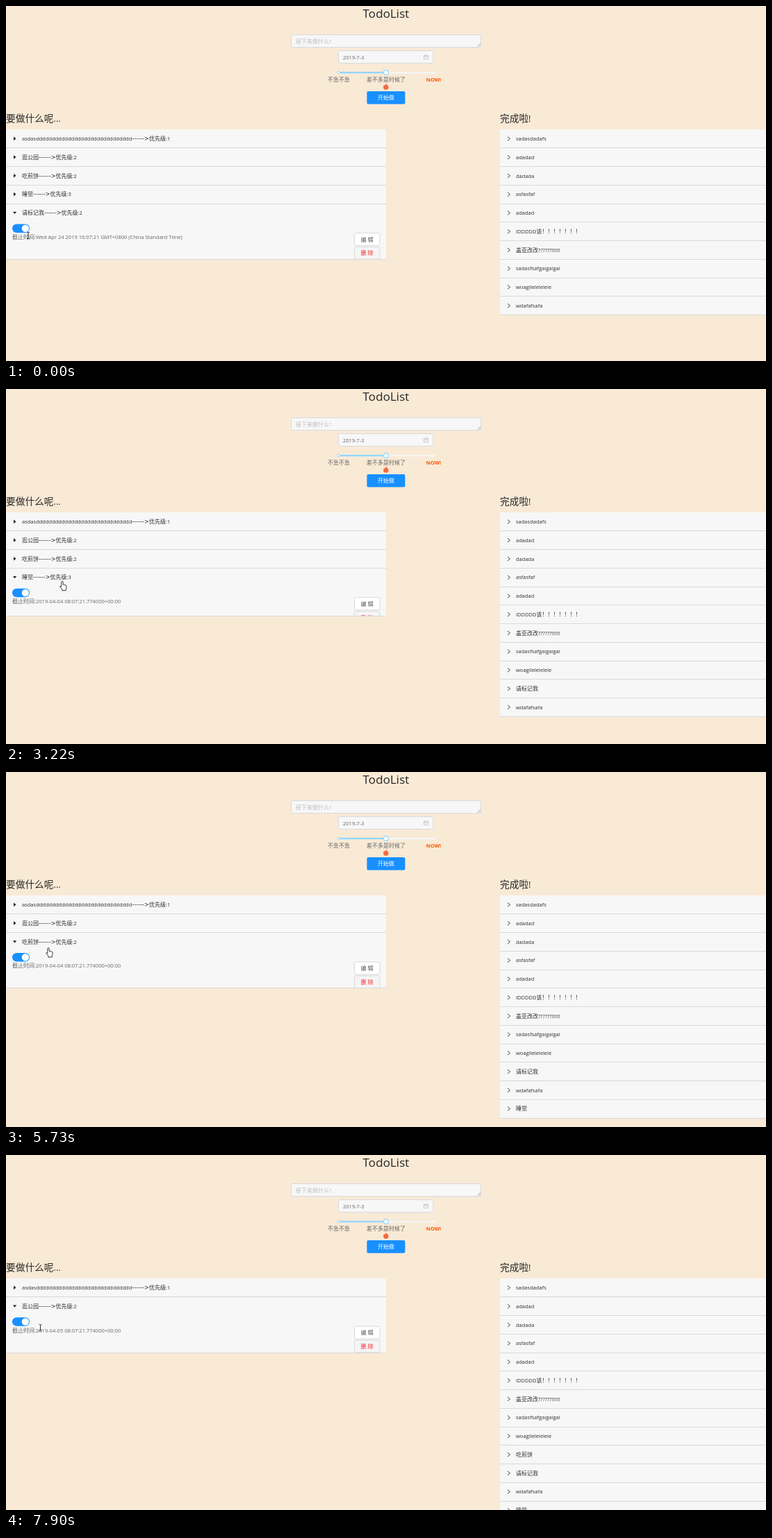
These frames come from a looping animation (1094x512 px, 8000 ms). An HTML page:

```html
<!DOCTYPE html>
<html lang="zh-CN">
<head>
<meta charset="utf-8">
<title>TodoList</title>
<style>
  html, body { margin: 0; width: 100%; height: 100%; overflow: hidden; background: #f9ead6; }
  svg { display: block; }
  text { font: 8px 'Open Sans', 'Noto Sans CJK SC', 'Noto Sans CJK JP', sans-serif; white-space: pre; }
  .latin { font-size: .94em; }
  .arrow { font: 8.2px 'DejaVu Sans', sans-serif; }
</style>
</head>
<body>
<svg id="stage" width="1094" height="512" viewBox="0 0 1094 512">
  <g id="form"></g>
  <g id="lists"></g>
</svg>
<script>
const LOOP = 8000, TOP = 178, ROW = 26.75, STEP = 134;
const INK = '#303030', SOFT = '#666', LINE = '#d9d9d9', PANEL = '#f7f7f7', BLUE = '#1890ff';

const todos = [
  { name: 'asdas' + 'd'.repeat(30), level: 1 },
  { name: '逛公园', level: 2, open: 7240, due: '2019-04-05 08:07:21.774000+00:00' },
  { name: '吃煎饼', level: 2, open: 5450, press: 6010, done: 6300, due: '2019-04-04 08:07:21.774000+00:00' },
  { name: '睡觉', level: 3, open: 2970, press: 4470, done: 4590, due: '2019-04-04 08:07:21.774000+00:00' },
  { name: '请标记我', level: 2, open: -1000, press: 1420, done: 1840,
    due: 'Wed Apr 24 2019 16:07:21 GMT+0800 (China Standard Time)' },
];
const finished = [
  ['sadasdadafs'], ['adadad'], ['dadada'], ['asfasfaf'], ['adadad'], ['IDDDDD该！！！！！！！'],
  ['盖亚改改??????!!!!!!'], ['sadasfsafgaigaigai'], ['woagilelelelele'],
  ['吃煎饼', 6300], ['请标记我', 1840], ['wdafafsafa'], ['睡觉', 4590],
];

// Pointer moves: start, end, number of visible steps, destination
const moves = [
  [150, 450, 3, 18.5, 323], [2120, 2700, 5, 81, 277.5], [3370, 3910, 5, 13.5, 296],
  [4870, 5300, 4, 76, 249.5], [5590, 5880, 3, 18.5, 266], [6440, 6970, 5, 62, 224],
  [7370, 7900, 5, 49.5, 249],
];
const pointers = {
  hand: 'M-1.2 6.5V1C-1.2-.6 1.1-.6 1.1 1V4.5L4.8 5.4Q6.4 5.9 6.1 8L5.2 11V13.2H-.2V11.6L-3.4 7.6Q-3.3 6-1.2 7.6Z',
  arrow: 'M0 0V9.6L2.2 7.6 3.9 11.3 5.5 10.6 3.9 7H6.8Z',
  beam: 'M-2-4.5H-.7L0-4 .7-4.5H2M0-4V4M-2 4.5H-.7L0 4 .7 4.5H2',
};

const clamp = v => Math.max(0, Math.min(1, v));
const smooth = v => v * v * (3 - 2 * v);
const mix = (a, b, f) => a + (b - a) * f;

const rect = (x, y, w, h, fill, attrs = '') =>
  `<rect x="${x}" y="${y}" width="${w}" height="${h}" fill="${fill}" ${attrs}/>`;
const box = (x, y, w, h, fill = PANEL) => rect(x, y, w, h, fill, `rx="2" stroke="${LINE}"`);
const path = (d, attrs) => `<path d="${d}" ${attrs}/>`;
const circle = (x, y, r, attrs) => `<circle cx="${x}" cy="${y}" r="${r}" ${attrs}/>`;
const text = (x, y, str, fill = INK, style = '') =>
  `<text x="${x}" y="${y}" fill="${fill}" style="${style}">` +
  str.replace(/[ -~]+/g, '<tspan class="latin">$&</tspan>')
     .replace('→', '<tspan class="arrow">------&gt;</tspan>') + '</text>';
const centered = (x, y, str, fill, style = '') => text(x, y, str, fill, 'text-anchor:middle;' + style);

function drawForm() {
  const track = '#91d5ff';
  return centered(547, 16.8, 'TodoList', '#262626', 'font-size:18.2px;font-weight:500')
    + box(410.5, 41.5, 273, 18) + text(417, 53.6, '接下来做什么?', '#bfbfbf')
    + path('M678.5 58.5L683 54M681 58.5L683 56.5', 'stroke="#888" stroke-width=".7"')
    + box(478.5, 64.5, 136.5, 18) + text(485, 76.6, '2019-7-3', SOFT)
    + path('M601.5 71.5H607.5V76.5H601.5ZM601.5 73.3H607.5M603 70V72M606 70V72', 'fill="none" stroke="#bfbfbf" stroke-width=".8"')
    + rect(478, 94.9, 138, 2.3, '#f5f5f5', 'rx="1"') + rect(479, 94.9, 68, 2.3, track)
    + circle(478.6, 96, 1.8, `fill="#fff" stroke="${track}"`) + circle(615.6, 96, 2, 'fill="#f7f7f7"')
    + circle(547, 96, 3.4, `fill="#fff" stroke="${track}" stroke-width="1.2"`)
    + centered(479, 109.3, '不急不急', SOFT) + centered(547, 109.3, '差不多是时候了', SOFT)
    + centered(615.5, 109.3, 'NOW!', '#f50', 'font-weight:700')
    + path('M546.6 111c.4 2 4 3.2 4 6.2a3.7 3.6 0 0 1-7.4 0c0-1.6.9-2.4 1-3.6.9.4 1.3 1 1.4 1.6.9-1 1.2-2.4 1-4.2z', 'fill="#f5683f"')
    + rect(519.5, 123, 55, 18.5, BLUE, 'rx="2"') + centered(547, 135.2, '开始做', '#fff', 'font-weight:500')
    + text(0, 166.6, '要做什么呢...', '#262626', 'font-size:13.7px')
    + text(711, 166.6, '完成啦!', '#262626', 'font-size:13.7px');
}

function drawSwitch(y, off) {
  const [r, g, b] = [[24, 191], [144, 191], [255, 191]].map(([on, end]) => Math.round(mix(on, end, off)));
  const halo = off ? rect(8, y - 7.2, 27, 14.4, BLUE, 'rx="7.2" opacity=".18"') : '';
  return halo + rect(9, y - 6.2, 25, 12.5, `rgb(${r},${g},${b})`, 'rx="6.2"')
    + circle(mix(27.9, 15.4, off), y, 5.2, 'fill="#fff"');
}

// Content below a header, placed relative to the header's bottom edge
function drawDetails(item, t) {
  const off = t < item.press || !item.press ? 0 : [0, .5, .8][Math.min(2, Math.floor((t - item.press) / STEP))];
  return drawSwitch(9, off) + text(9, 24.2, '截止时间:' + item.due, SOFT)
    + box(501.5, 15.7, 36.5, 18, '#fff') + centered(519.7, 27.8, '编 辑', '#555')
    + box(501.5, 35.7, 36.5, 17.6, '#f5f5f5') + centered(519.7, 47.6, '删 除', '#f5222d');
}

const panel = (x, w, h) => rect(x, TOP, w, h, PANEL, 'rx="2"');
const divider = (x, y, w) => rect(x, Math.round(y - .3), w, 1, LINE);

function drawTodos(t, mouse) {
  let y = TOP, rows = '', pointer = 'arrow';
  for (const item of todos) {
    if (t >= item.done) continue;
    const opened = t >= item.open;
    const age = opened ? Math.floor((t - item.open) / STEP) * STEP + 50 : 0;
    const extra = 2 * ROW * smooth(clamp(age / 260));
    const mid = y + 13.2, dy = mouse.y - y;
    rows += path(opened ? `M10 ${mid - 1.4}h5.2l-2.6 3.2z` : `M11 ${mid - 2.6}v5.4l3.5-2.7z`, 'fill="#222"')
      + text(23, mid + 2.9, `${item.name}→优先级:${item.level}`);
    if (opened) rows += `<svg y="${y + ROW}" width="547" height="${extra}">${drawDetails(item, t)}</svg>`;
    if (dy >= 0 && dy < ROW + extra) {
      if (dy < ROW || (mouse.x < 34 && dy > 29 && dy < 43)) pointer = 'hand';
      else if (mouse.x < 260 && dy >= 43) pointer = 'beam';
    }
    y += ROW + extra;
    rows += divider(0, y, 547);
  }
  return { svg: panel(0, 547, y - TOP) + rows, pointer };
}

function drawFinished(t) {
  const names = finished.filter(([, since = 0]) => t >= since);
  return panel(711, 383, names.length * ROW) + names.map(([name], i) => {
    const mid = TOP + i * ROW + 13.2;
    return path(`M722 ${mid - 2.7}l3.6 2.9-3.6 2.9`, 'fill="none" stroke="#333" stroke-width=".9"')
      + text(734, mid + 2.9, name) + divider(711, TOP + (i + 1) * ROW, 383);
  }).join('');
}

function mouseAt(t) {
  let x = 32, y = 331;
  for (const [start, end, steps, toX, toY] of moves) {
    if (t < start) break;
    const step = Math.floor((t - start) / (end - start) * (steps - 1) + 1e-6) + 1;
    const f = smooth(clamp(step / steps));
    x = mix(x, toX, f);
    y = mix(y, toY, f);
  }
  return { x, y };
}

function drawPointer(kind, { x, y }) {
  const look = kind === 'beam' ? 'fill="none" stroke="#222" stroke-width=".9"'
    : 'fill="#fff" stroke="#222" stroke-width=".9" stroke-linejoin="round"';
  return path(pointers[kind], `${look} transform="translate(${x} ${y})"`);
}

const lists = document.getElementById('lists');
let shown = '';
function tick() {
  const t = performance.now() % LOOP;
  const mouse = mouseAt(t), left = drawTodos(t, mouse);
  const scene = left.svg + drawFinished(t) + drawPointer(left.pointer, mouse);
  if (scene !== shown) lists.innerHTML = shown = scene;
  requestAnimationFrame(tick);
}
document.getElementById('form').innerHTML = drawForm();
tick();
</script>
</body>
</html>
```
